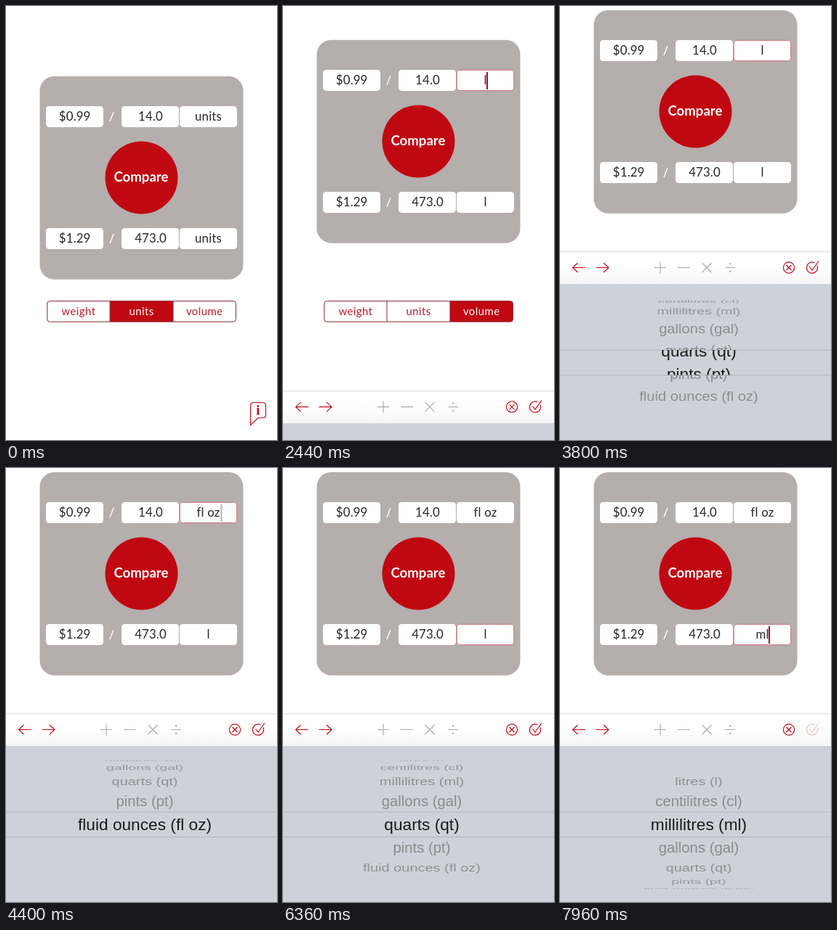
An HTML page that plays this animation: 373x598 px, repeating every 8000 ms.

```html
<!DOCTYPE html>
<html lang="en">
<head>
<meta charset="utf-8">
<title>Unit price comparison</title>
<style>
  html, body { margin: 0; width: 100%; height: 100%; overflow: hidden; background: #fff; }
  svg { display: block; width: 373px; height: 598px; }
  text { text-anchor: middle; font-family: Lato, sans-serif; }
  .field { font-size: 16.8px; letter-spacing: .15px; fill: #262626; }
  .go { font-size: 18.6px; font-weight: 700; fill: #fff; }
  .seg { font-size: 14.8px; letter-spacing: .5px; }
  .row { font-family: "Liberation Sans", Arial, sans-serif; font-size: 22.7px; }
  .red { fill: none; stroke: #c00812; stroke-width: 1.15; }
  .gray { fill: none; stroke: #a9a9ab; stroke-width: 1.1; }
</style>
</head>
<body>
<svg viewBox="0 0 373 598">
  <defs>
    <linearGradient id="bar" x2="0" y2="1">
      <stop offset=".4" stop-color="#fff"/><stop offset="1" stop-color="#f6f6f7"/>
    </linearGradient>
    <clipPath id="outside"><path d="M0 383H373V474H0ZM0 508.5H373V598H0Z"/></clipPath>
    <clipPath id="inside"><path d="M0 474H373V508.5H0Z"/></clipPath>
    <clipPath id="pill"><rect x="56.5" y="406.5" width="260" height="28.5" rx="3.5"/></clipPath>
  </defs>

  <g id="card">
    <rect x="46.5" y="96.7" width="280" height="280" rx="20" fill="#b4aead"/>
    <circle cx="186.5" cy="236.5" r="50" fill="#c00812"/>
    <text class="go" x="186" y="242.3">Compare</text>
    <g id="lines"></g>
  </g>

  <g id="segments"></g>

  <path class="red" d="M336.6 577.5V550.5Q336.6 546.5 340.6 546.5H353.5Q357.5 546.5 357.5 550.5V563.5Q357.5 567.5 353.5 567.5H347Z"/>
  <text x="347" y="563" fill="#c00812" style="font:bold 19px 'Liberation Serif',serif">i</text>

  <g id="keyboard">
    <rect y="338.5" width="373" height="45" fill="url(#bar)"/>
    <path d="M0 338.7H373" stroke="#d9d9db"/>
    <rect y="383" width="373" height="215" fill="#cfd1da"/>
    <path class="red" d="M35 360.5H17.5M24.5 354L17.5 360.5L24.5 367"/>
    <g id="next"><path class="red" d="M49.5 360.5H67M60 354L67 360.5L60 367"/></g>
    <path class="gray" d="M130 360.5H146M138 352.5V368.5M162 360.5H179M195.5 354L208.5 367M208.5 354L195.5 367M227.5 360.5H241"/>
    <circle cx="234.2" cy="355.3" r="1.2" fill="#a9a9ab"/>
    <circle cx="234.2" cy="365.7" r="1.2" fill="#a9a9ab"/>
    <path class="red" d="M311.5 357L318.5 364M318.5 357L311.5 364"/>
    <circle class="red" cx="315" cy="360.5" r="7.6"/>
    <g id="done">
      <path class="red" d="M354 357.5A7.6 7.6 0 1 1 350.5 353.8M343.5 359.5L347 364L356 351.5"/>
    </g>
    <path d="M0 474H373M0 508.5H373" stroke="#b3b5bc"/>
    <g id="wheel" clip-path="url(#outside)"></g>
    <g id="lens" clip-path="url(#inside)"></g>
  </g>
</svg>
<script>
const LOOP = 8000;
const $ = id => document.getElementById(id);

function add(parent, tag, attrs, label) {
  const el = document.createElementNS('http://www.w3.org/2000/svg', tag);
  for (const k in attrs) el.setAttribute(k, attrs[k]);
  if (label) el.textContent = label;
  return parent.appendChild(el);
}
const set = (el, k, v) => el.setAttribute(k, v);
const ramp = (t, a, b) => Math.min(1, Math.max(0, (t - a) / (b - a)));
const mix = (a, b, p) => a + (b - a) * p;

// Critically damped spring from 0 to 1
function spring(ms) {
  const x = Math.max(0, ms) * 0.01826;
  return 1 - (1 + x) * Math.exp(-x);
}

function makeLine(y, price, amount) {
  const g = add($('lines'), 'g', { transform: `translate(0 ${y})` });
  const box = x => add(g, 'rect', { x, width: 79, height: 29, rx: 4.5, fill: '#fff' });
  const label = (x, s) => add(g, 'text', { class: 'field', x, y: 20.4 }, s);
  box(55); box(159); box(239);
  label(94.7, price); label(199, amount);
  add(g, 'path', { d: 'M143 21L148 8', stroke: '#fff', 'stroke-width': 1.4 });
  return {
    border: add(g, 'rect', {
      x: 239.3, y: .4, width: 78.4, height: 28.2, rx: 4.2, fill: 'none', stroke: '#cf6b75'
    }),
    before: label(278.5, 'units'),
    after: label(278.5, 'l'),
    caret: add(g, 'rect', { y: 3, width: 2, height: 24, fill: '#a80f1e' })
  };
}
const lines = [makeLine(138, '$0.99', '14.0'), makeLine(306, '$1.29', '473.0')];

const segs = ['weight', 'units', 'volume'].map((name, i) => ({
  fill: add($('segments'), 'rect', {
    x: 56.5 + 86.7 * i, y: 406.5, width: 86.7, height: 28.5, fill: '#c00812', 'clip-path': 'url(#pill)'
  }),
  text: add($('segments'), 'text', { class: 'seg', x: 100 + 86.6 * i, y: 426.2 }, name)
}));
add($('segments'), 'path', { d: 'M143 407V435M230 407V435', stroke: '#8e2330' });
add($('segments'), 'rect', {
  x: 56.8, y: 406.6, width: 259.6, height: 28.5, rx: 3.5, fill: 'none', stroke: '#8e2330'
});

const rows = ['litres (l)', 'centilitres (cl)', 'millilitres (ml)', 'gallons (gal)',
  'quarts (qt)', 'pints (pt)', 'fluid ounces (fl oz)'].map(s => ({
  rim: add($('wheel'), 'text', { class: 'row', y: 7.5, fill: '#8b898b' }, s),
  flat: add($('lens'), 'text', { class: 'row', y: 7.8, fill: '#1a1a1a' }, s)
}));

function drawPicker(pos) {
  rows.forEach(({ rim, flat }, i) => {
    const off = i - pos, a = off * 0.37, c = Math.cos(a);
    const shown = Math.abs(a) < 1.55;
    set(rim, 'visibility', shown ? 'visible' : 'hidden');
    set(rim, 'opacity', 0.65 + 0.35 * c);
    set(rim, 'transform', `translate(191 ${491.5 + 88 * Math.sin(a)}) scale(${0.82 + 0.08 * c} ${0.92 * c})`);
    set(flat, 'transform', `translate(191 ${491.5 + 31.6 * off})`);
  });
}

function pickerPos(t) {
  if (t < 6080) {
    const p = ramp(t, 3340, 4120) ** 0.75;
    return 6 * p * p * (3 - 2 * p);
  }
  return mix(2, 6, (1 - ramp(t, 6080, 7120)) ** 2.2);
}

const caretX = { 'l': 280, 'fl oz': 295.5, 'ml': 287 };

function drawLine(line, unit, swap, active, caret) {
  set(line.before, 'opacity', 1 - swap);
  set(line.after, 'opacity', swap);
  if (line.after.textContent !== unit) line.after.textContent = unit;
  set(line.border, 'opacity', active ? 1 : 0);
  set(line.caret, 'x', caretX[unit]);
  set(line.caret, 'opacity', active ? caret : 0);
}

function draw(t) {
  const open = t >= 2440;
  const swap = ramp(t, 1360, 1600);
  set($('card'), 'transform', `translate(0 ${open ? -91 * spring(t - 2340) : 0})`);
  set($('keyboard'), 'transform', `translate(0 ${open ? 259 * (1 - spring(t - 2387)) : 260})`);

  const press = t >= 1240 ? 0.15 : 0;
  [0, 1 - swap, mix(press, 1, swap)].forEach((on, i) => {
    set(segs[i].fill, 'opacity', on);
    set(segs[i].text, 'fill', on > 0.5 ? '#fff' : '#bb1a28');
  });

  const second = t >= 5480;
  const caret = t < 4000 ? 1 - ramp(t, 2900, 3120)
    : t < 5480 ? ramp(t, 4300, 4560) - ramp(t, 4940, 5200)
    : 1 - ramp(t, 5860, 6080) + ramp(t, 7300, 7520);
  drawLine(lines[0], t < 4320 ? 'l' : 'fl oz', swap, open && !second, caret);
  drawLine(lines[1], t < 7320 ? 'l' : 'ml', swap, second, caret);

  drawPicker(pickerPos(t));
  set($('next'), 'opacity', t >= 5400 && t < 5480 ? 0.25 : 1);
  set($('done'), 'opacity', t >= 7960 ? 0.25 : 1);
}

function tick() {
  draw(performance.now() % LOOP);
  requestAnimationFrame(tick);
}
tick();
</script>
</body>
</html>
```
